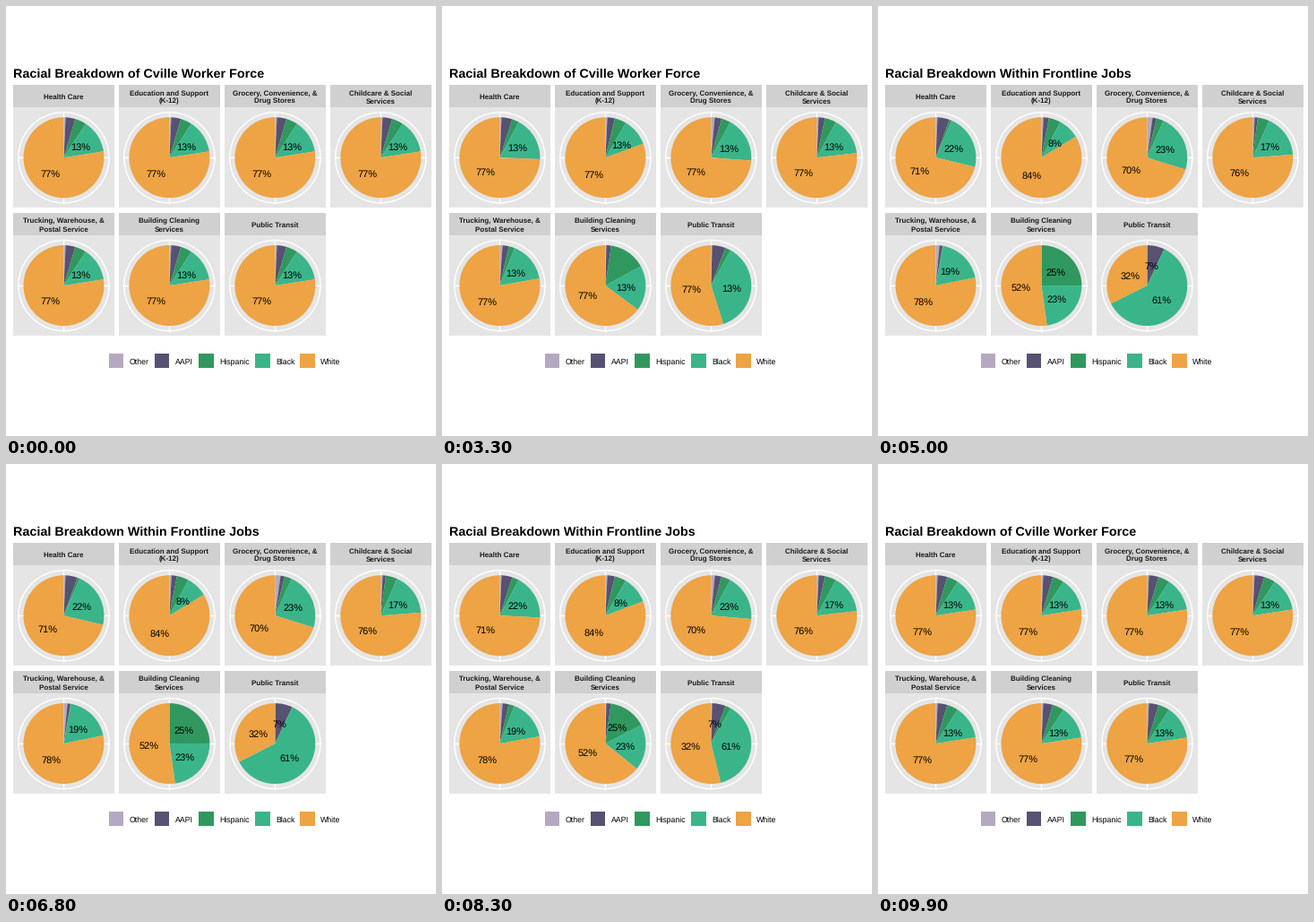
Recreate the animation shown at these times as a matplotlib script. Size 480 by 480 pixels, loop 10 s.

```python
import math

import matplotlib.pyplot as plt
from matplotlib.animation import FuncAnimation
from matplotlib.patches import Circle, Rectangle, Wedge

plt.rcParams.update({
    "font.family": "Liberation Sans",
    "text.hinting": "none",
    "text.hinting_factor": 8,
    "toolbar": "None",
})

SIZE, DPI = 480, 72  # at 72 dpi one point is one pixel
FRAMES, INTERVAL = 100, 100

TITLES = ("Racial Breakdown of Cville Worker Force",
          "Racial Breakdown Within Frontline Jobs")
GROUPS = ("Other", "AAPI", "Hispanic", "Black", "White")
COLORS = ("#B5A9C1", "#575172", "#30985E", "#3AB58A", "#EEA344")
LEGEND_X = (114.6, 165.7, 215.4, 278.3, 328.4)

# Cumulative shares at the end of the first four slices, and slice labels.
CITY_BOUNDS = (0.0075, 0.046, 0.0915, 0.2255)
CITY_LABELS = {"Black": "13%", "White": "77%"}
JOBS = (
    ("Health Care", (0.007, 0.055, 0.065, 0.287),
     {"Black": "22%", "White": "71%"}),
    ("Education and Support\n(K-12)", (0.0085, 0.030, 0.078, 0.163),
     {"Black": "8%", "White": "84%"}),
    ("Grocery, Convenience, &\nDrug Stores", (0.022, 0.038, 0.067, 0.298),
     {"Black": "23%", "White": "70%"}),
    ("Childcare & Social\nServices", (0.008, 0.020, 0.067, 0.238),
     {"Black": "17%", "White": "76%"}),
    ("Trucking, Warehouse, &\nPostal Service", (0.015, 0.027, 0.029, 0.218),
     {"Black": "19%", "White": "78%"}),
    ("Building Cleaning\nServices", (0.0, 0.0, 0.250, 0.478),
     {"Hispanic": "25%", "Black": "23%", "White": "52%"}),
    ("Public Transit", (0.001, 0.070, 0.070, 0.676),
     {"AAPI": "7%", "Black": "61%", "White": "32%"}),
)

PANEL, STRIP, GAP = 112.44, 24.9, 5.5
LEFT, TOP = 8.25, 88.1
RADIUS, RING = 0.4 * PANEL, 0.45 * PANEL
GRID = dict(color="white", linewidth=1.42)

fig = plt.figure(figsize=(SIZE / DPI, SIZE / DPI), dpi=DPI, facecolor="white")
ax = fig.add_axes((0, 0, 1, 1))
ax.set(xlim=(0, SIZE), ylim=(SIZE, 0))
ax.axis("off")


def box(x, y, w, h, color):
    ax.add_patch(Rectangle((x, y), w, h, facecolor=color, linewidth=0))


def polar(cx, cy, radius, share):
    """Point at a share of the turn, clockwise from the top."""
    angle = 2 * math.pi * share
    return cx + radius * math.sin(angle), cy - radius * math.cos(angle)


class Pie:
    def __init__(self, index, name, bounds, labels):
        row, col = divmod(index, 4)
        x = LEFT + col * (PANEL + GAP)
        y = TOP + row * (PANEL + GAP + STRIP)
        self.center = cx, cy = x + PANEL / 2, y + STRIP + PANEL / 2
        self.bounds, self.labels = bounds, labels

        box(x, y, PANEL, STRIP, "#D0D0D0")
        box(x, y + STRIP, PANEL, PANEL, "#E5E5E5")
        lines = name.split("\n")
        first = 16.2 - 4.4 * (len(lines) - 1)
        for i, line in enumerate(lines):
            ax.text(cx, y + first + 8.8 * i, line, size=8, weight="bold",
                    color="#1A1A1A", ha="center", va="baseline")

        ax.add_patch(Circle((cx, cy), RING, fill=False, **GRID))
        for share in (0, 0.25, 0.5, 0.75):
            px, py = polar(cx, cy, RING, share)
            ax.plot((cx, px), (cy, py), zorder=1, **GRID)

        self.slices = [ax.add_patch(Wedge((cx, cy), RADIUS, 0, 1, facecolor=c,
                                          linewidth=0, zorder=2))
                       for c in COLORS]
        self.texts = [ax.text(cx, cy, "", size=11, color="black", ha="center",
                              va="baseline", zorder=3) for _ in GROUPS]

    def update(self, mix):
        inner = [(1 - mix) * a + mix * b
                 for a, b in zip(CITY_BOUNDS, self.bounds)]
        edges = [0, *inner, 1]
        labels = self.labels if mix > 0.5 else CITY_LABELS
        for i, group in enumerate(GROUPS):
            start, end = edges[i], edges[i + 1]
            self.slices[i].set_theta1(360 * start - 90)
            self.slices[i].set_theta2(360 * end - 90)
            self.slices[i].set_visible(end - start > 1e-6)
            x, y = polar(*self.center, RADIUS / 2, (start + end) / 2)
            self.texts[i].set_position((x, y + 4.3))
            self.texts[i].set_text(labels.get(group, ""))


def ease(p):
    """Sine in and out, held outside 0..1."""
    p = min(max(p, 0), 1)
    return (1 - math.cos(math.pi * p)) / 2


def job_mix(frame):
    """0 shows the whole work force, 1 shows the single jobs."""
    if frame <= 50:
        return ease((frame - 16) / 34)
    return 1 - ease((frame - 67) / 33)


title = ax.text(8.2, 80.1, "", size=14.4, weight="bold", color="black",
                va="baseline")
pies = [Pie(i, *job) for i, job in enumerate(JOBS)]
for x, group, color in zip(LEGEND_X, GROUPS, COLORS):
    box(x, 388, 16.4, 16.4, color)
    ax.text(x + 22.9, 400.3, group, size=8.8, color="black", va="baseline")


def update(frame):
    mix = job_mix(frame)
    title.set_text(TITLES[mix > 0.5])
    for pie in pies:
        pie.update(mix)
    return []


anim = FuncAnimation(fig, update, frames=FRAMES, interval=INTERVAL,
                     init_func=lambda: update(0), repeat=True, repeat_delay=0)
plt.show()
```
